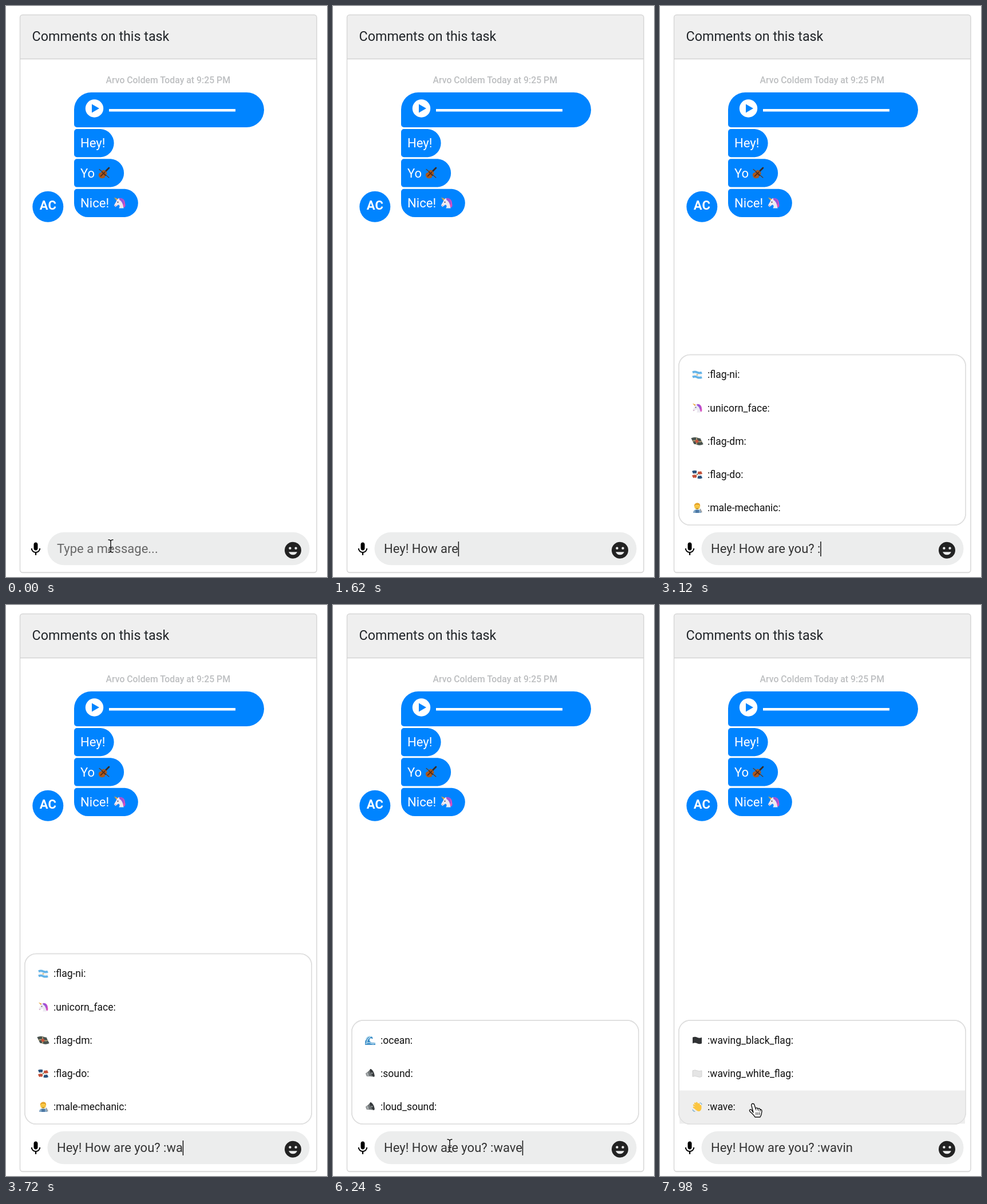
An HTML page that plays this animation: 561 by 998 pixels, repeating every 8 s.

```html
<!DOCTYPE html>
<html lang="en">
<head>
<meta charset="utf-8">
<title>Task comments</title>
<style>
  html, body { margin: 0; width: 100%; height: 100%; overflow: hidden; background: #fff; }
  svg { display: block; width: 100%; height: 100%; font-family: Roboto, sans-serif; }
  text { white-space: pre; }
  .bubble, .avatar { fill: #0084ff; }
  .message { font-size: 22.1px; fill: #fff; }
  .input { font-size: 22px; }
  .option { font-size: 17.5px; fill: #111; }
</style>
</head>
<body>
<svg viewBox="0 0 561 998">
  <defs>
    <g id="violin" stroke-linecap="round">
      <path d="M-1 1L7-7" stroke="#3a2a24" stroke-width="2.4"/>
      <path d="M-8 3C-8 0-5 0-4-1C-3-5 1-5 2-2C6 0 4 3 2 3C1 5 2 8-2 8C-6 9-8 6-8 3Z" fill="#a9581f"/>
      <path d="M-5 5L1-1M-3-1L2 4" stroke="#4b2412" stroke-width="1.3"/>
      <path d="M-7-5L7 7" stroke="#5c3a25" stroke-width="1.1"/>
    </g>
    <g id="unicorn">
      <path d="M-4-3L-8-8L-1-5Z" fill="#e9a83a"/>
      <path d="M-3-5C1-9 8-6 8 1C9 4 8 6 7 7L2 3Z" fill="#d54fc0"/>
      <path d="M-1-6C4-8 7-3 6 2L3 2Z" fill="#9a55d8"/>
      <path d="M-4-4L-1-7L0-4C4-2 5 3 6 8H-1C1 5 0 3-2 3L-6 6L-8 4C-7 1-5-1-4-4Z" fill="#ece9f1"/>
      <circle cx="-2.5" cy="-1" r=".9" fill="#44394e"/>
      <path d="M-7 4.5L-5 4" stroke="#c58fb2"/>
    </g>
    <g id="flag-ni" fill="none" stroke-width="4">
      <path d="M-8-3.8q4-2 8 0t8 0M-8 4.2q4-2 8 0t8 0" stroke="#63b3e8"/>
      <path d="M-8 .2q4-2 8 0t8 0" stroke="#f2f4f5"/>
      <circle cy=".2" r="1" stroke="#c2b06d" stroke-width="1"/>
    </g>
    <g id="flag-dm" fill="none">
      <path d="M-8 0q4-2 8 0t8 0" stroke="#49534f" stroke-width="12"/>
      <path d="M-8 0q4-2 8 0t8 0M-1-6V6" stroke="#b7a77b" stroke-width="1.8"/>
      <circle cx="-.5" r="2.8" fill="#c6533d"/>
    </g>
    <g id="flag-do" fill="none" stroke-width="5">
      <path d="M-8-3.5q4-2 7 0M1 4q3 2 7 0" stroke="#29527d"/>
      <path d="M1-3.5q3 2 7 0M-8 4q4-2 7 0" stroke="#c4513a"/>
      <path d="M-8 0q4-2 8 0t8 0M0-6V6" stroke="#eee" stroke-width="2"/>
      <circle r="1" fill="#41684a"/>
    </g>
    <g id="mechanic">
      <path d="M-7 9C-7 4-4 3 0 3S7 4 7 9Z" fill="#84a9c8"/>
      <path d="M-3 4H3V9H-3Z" fill="#4c78a4"/>
      <circle cy="-2" r="5" fill="#fccb47"/>
      <path d="M-5-2C-7-10 7-11 5-2L3-5H-3Z" fill="#e5a52b"/>
      <path d="M-2 1Q0 2 2 1M-2-2v.6M2-2v.6" fill="none" stroke="#82551e" stroke-width=".9"/>
      <path d="M5 2L8 8" stroke="#9a9da0" stroke-width="1.8"/>
    </g>
    <g id="ocean">
      <path d="M-9 7C-9-2-6-8 0-7C4-7 5-4 4-2C1-5-2-3-1 1C0 4 4 5 9 4V8H-9Z" fill="#3489c5"/>
      <path d="M-8 0C-6-6-2-8 2-6M-6 4C-5-2-3-4 0-5M-8 6Q-3 3 1 5T9 5" fill="none" stroke="#cfeaf6" stroke-width="1.4"/>
    </g>
    <g id="speaker">
      <path d="M-8 0L-4-3L1-8C6-5 8 0 7 6L0 5L-6 5Z" fill="#6e7375"/>
      <ellipse cx="3.5" cy="-1" rx="2.5" ry="7.5" transform="rotate(-28 3.5 -1)" fill="#34383a"/>
      <path d="M-7 0L-4-2L-2 4L-5 5Z" fill="#a8adaf"/>
      <circle cx="3" cy="-.5" r="1.5" fill="#8c9193"/>
    </g>
    <path id="flag-black" d="M-8-5q4-2 8 0t8 0V5.500q-4 2-8 0t-8 0Z" fill="#303234"/>
    <path id="flag-white" d="M-8-5q4-2 8 0t8 0V5.500q-4 2-8 0t-8 0Z" fill="#e5e5e5" stroke="#c8c8c8" stroke-width=".7"/>
    <g id="hand" fill="none" stroke-linecap="round">
      <path d="M-1 0L-6-3M1-1L-4-6M3-1L-1-7M5 1L3-5M-2 3L-6 1" stroke="#fbc540" stroke-width="2.7"/>
      <path d="M-4 0L3-3L7-3C8 1 8 7 3 8C0 8-3 5-5 3Z" fill="#fbc540"/>
      <path d="M5-7Q8-6 8-4M-8 5Q-7 8-4 8" stroke="#6ba7cf" stroke-width="1.1"/>
    </g>
  </defs>

  <rect x="24" y="16.500" width="519.500" height="975" rx="5" fill="#eee"/>
  <rect x="24.500" y="15.500" width="518.500" height="974.500" rx="4.500" fill="#fff"/>
  <path d="M24.500 92.500V20a4.500 4.500 0 0 1 4.500-4.500H538.500a4.500 4.500 0 0 1 4.500 4.500V92.500Z" fill="#efefef"/>
  <path d="M24.500 92.500H543" stroke="#d3d3d3" stroke-width="1.4"/>
  <rect x="24.500" y="15.500" width="518.500" height="974.500" rx="4.500" fill="none" stroke="#d6d6d6" stroke-width="1.4"/>
  <text x="45.500" y="61" font-size="23.3" fill="#212529">Comments on this task</text>
  <text x="392" y="135" text-anchor="end" font-size="15.8" font-weight="500" fill="#bdbfc1">Arvo Coldem Today at 9:25 PM</text>

  <g class="bubble">
    <path d="M149 151H420.500a30 30 0 0 1 0 61H124a5 5 0 0 1-5-5V181a30 30 0 0 1 30-30Z"/>
    <path d="M124 215H165.500a24.700 24.700 0 0 1 0 49.300H124a5 5 0 0 1-5-5V220a5 5 0 0 1 5-5Z"/>
    <path d="M124 267.300H183a24.700 24.700 0 0 1 0 49.300H124a5 5 0 0 1-5-5V272.300a5 5 0 0 1 5-5Z"/>
    <path d="M124 319.700H207.700a24.700 24.700 0 0 1 0 49.300H143.500a24.500 24.500 0 0 1-24.500-24.500V324.700a5 5 0 0 1 5-5Z"/>
  </g>
  <circle cx="154.500" cy="179" r="15.700" fill="#fff"/>
  <path class="bubble" d="M150 171.500L163 179L150 186.500Z"/>
  <path d="M180 182.300H401" stroke="#fff" stroke-width="4.400"/>
  <g class="message">
    <text x="130" y="247.300">Hey!</text>
    <text x="130" y="299.500">Yo</text>
    <text x="130" y="352">Nice!</text>
  </g>
  <use href="#violin" transform="translate(171.500 291.500) scale(1.2)"/>
  <use href="#unicorn" transform="translate(198.500 344) scale(1.2)"/>
  <circle class="avatar" cx="73.300" cy="350.800" r="27"/>
  <text x="73.300" y="356" text-anchor="middle" font-size="22" font-weight="700" fill="#fff">AC</text>

  <g id="menu"></g>

  <rect x="72.500" y="919.700" width="458" height="57.600" rx="28.800" fill="#eceded"/>
  <path transform="translate(38 935.200) scale(1.165)" d="M12 14c1.660 0 3-1.340 3-3V5c0-1.660-1.340-3-3-3S9 3.340 9 5v6c0 1.660 1.340 3 3 3zm5.300-3c0 3-2.540 5.100-5.300 5.100S6.700 14 6.700 11H5c0 3.410 2.720 6.230 6 6.720V21h2v-3.280c3.280-.480 6-3.300 6-6.720z"/>
  <g transform="translate(501.500 951.300) scale(1.45)">
    <circle r="10" fill="#222"/>
    <g fill="#eceded">
      <circle cx="-3.500" cy="-2.500" r="1.500"/><circle cx="3.500" cy="-2.500" r="1.500"/>
      <path d="M-5.100 2H5.100A5.500 5.500 0 0 1-5.100 2Z"/>
    </g>
  </g>
  <text id="field" class="input" x="89" y="956.300"></text>
  <path id="caret" stroke="#111" stroke-width="1.500"/>

  <g id="ibeam" fill="none" stroke-linecap="round">
    <path id="beam" d="M-4-11Q0-11 0-8Q0-11 4-11M0-8V8M-4 11Q0 11 0 8Q0 11 4 11M-2.500 3H2.500" stroke="#fff" stroke-width="3" opacity=".75"/>
    <path d="M-4-11Q0-11 0-8Q0-11 4-11M0-8V8M-4 11Q0 11 0 8Q0 11 4 11M-2.500 3H2.500" stroke="#111" stroke-width="1.500"/>
  </g>
  <g id="finger" stroke="#111" stroke-width="1.400" stroke-linejoin="round" stroke-linecap="round">
    <path d="M-3 4L-6-8C-7-12-2-13-1-9L1-3C2-5 5-4 5-2C6-4 9-3 9-1C11-2 12 0 12 2L11 8L9 12H0C-2 8-6 5-9 2C-11-1-7-3-5 1Z" fill="#fff"/>
    <path d="M1-3L2 0M5-2L6 1M9-1V2M2 4V8M5 4V8M8 4V8" fill="none" stroke-width="1"/>
  </g>
</svg>

<script>
const DURATION = 8000, STEP = 60, ROW = 58.15;
const byId = id => document.getElementById(id);
const [menu, field, caret, ibeam, finger] = ["menu", "field", "caret", "ibeam", "finger"].map(byId);

// Keystrokes: each entry is [time, field contents].
const keys = [];
let draft = "";
const press = (time, text) => keys.push([time, draft = text]);
const type = (text, start, gap) => [...text].forEach((c, i) => press(start + i * gap, draft + c));
type("Hey! How are", 600, 90);
type(" you? ", 1740, 120);
type(":", 2700, 0);
type("wave", 3420, 180);
press(6900, draft.slice(0, -1));
type("in", 7260, 180);

const menus = {
  all: [["flag-ni", ":flag-ni:"], ["unicorn", ":unicorn_face:"], ["flag-dm", ":flag-dm:"],
        ["flag-do", ":flag-do:"], ["mechanic", ":male-mechanic:"]],
  wave: [["ocean", ":ocean:"], ["speaker", ":sound:"], ["speaker", ":loud_sound:"]],
  waving: [["flag-black", ":waving_black_flag:"], ["flag-white", ":waving_white_flag:"], ["hand", ":wave:"]]
};
const menuFor = text =>
  !text.includes(":") ? "" : text.includes(":wavi") ? "waving" : text.includes(":wav") ? "wave" : "all";

let shownMenu;
function drawMenu(name, hovered) {
  const key = name + hovered;
  if (key === shownMenu) return;
  shownMenu = key;
  const items = menus[name];
  if (!items) { menu.innerHTML = ""; return; }
  const height = items.length * ROW + 7;
  const frame = fill => `<rect x="32.8" y="${907.3 - height}" width="501.400" height="${height}" rx="20"
    fill="${fill}" stroke="#dfdfdf" stroke-width="1.600"/>`;
  const rows = items.map(([icon, label], i) => {
    const y = 877 - (items.length - 1 - i) * ROW;
    return `<use href="#${icon}" transform="translate(65 ${y})"/>
      <text class="option" x="83" y="${y + 6}">${label}</text>`;
  });
  const highlight = hovered ? '<rect x="34" y="848.5" width="499" height="58" fill="#eee"/>' : "";
  menu.innerHTML = frame("#fff") + highlight + frame("none") + rows.join("");
}

const ease = (t, start, end) => {
  const u = Math.min(1, Math.max(0, (t - start) / (end - start)));
  return u * u * (3 - 2 * u);
};
const show = (el, on) => el.setAttribute("visibility", on ? "visible" : "hidden");

function render(t) {
  const [pressed, text] = keys.filter(k => k[0] <= t).pop() || [null, ""];
  field.textContent = text || "Type a message...";
  field.setAttribute("fill", text ? "#333" : "#666");
  show(caret, text && (t - pressed) % 1000 < 500);
  const caretX = 89.5 + (text ? field.getComputedTextLength() : 0);
  caret.setAttribute("d", `M${caretX} 936V962`);

  // The pointer hides while keys are pressed.
  const visible = t < 600 || (t >= 4320 && t < 6900) || t >= 7560;
  const drift = ease(t, 5100, 6100), rise = ease(t, 7560, 7860);
  const x = 183 + 21 * drift - 38 * rise;
  const y = 944 + drift - 62 * rise;
  const hovered = visible && y < 907;
  show(ibeam, visible && !hovered);
  show(finger, hovered);
  for (const el of [ibeam, finger]) el.setAttribute("transform", `translate(${x} ${y})`);
  drawMenu(menuFor(text), hovered);
}

const origin = performance.now();
function tick() {
  const t = (performance.now() - origin) % DURATION;
  render(Math.floor(t / STEP) * STEP);
  requestAnimationFrame(tick);
}
tick();
</script>
</body>
</html>
```
